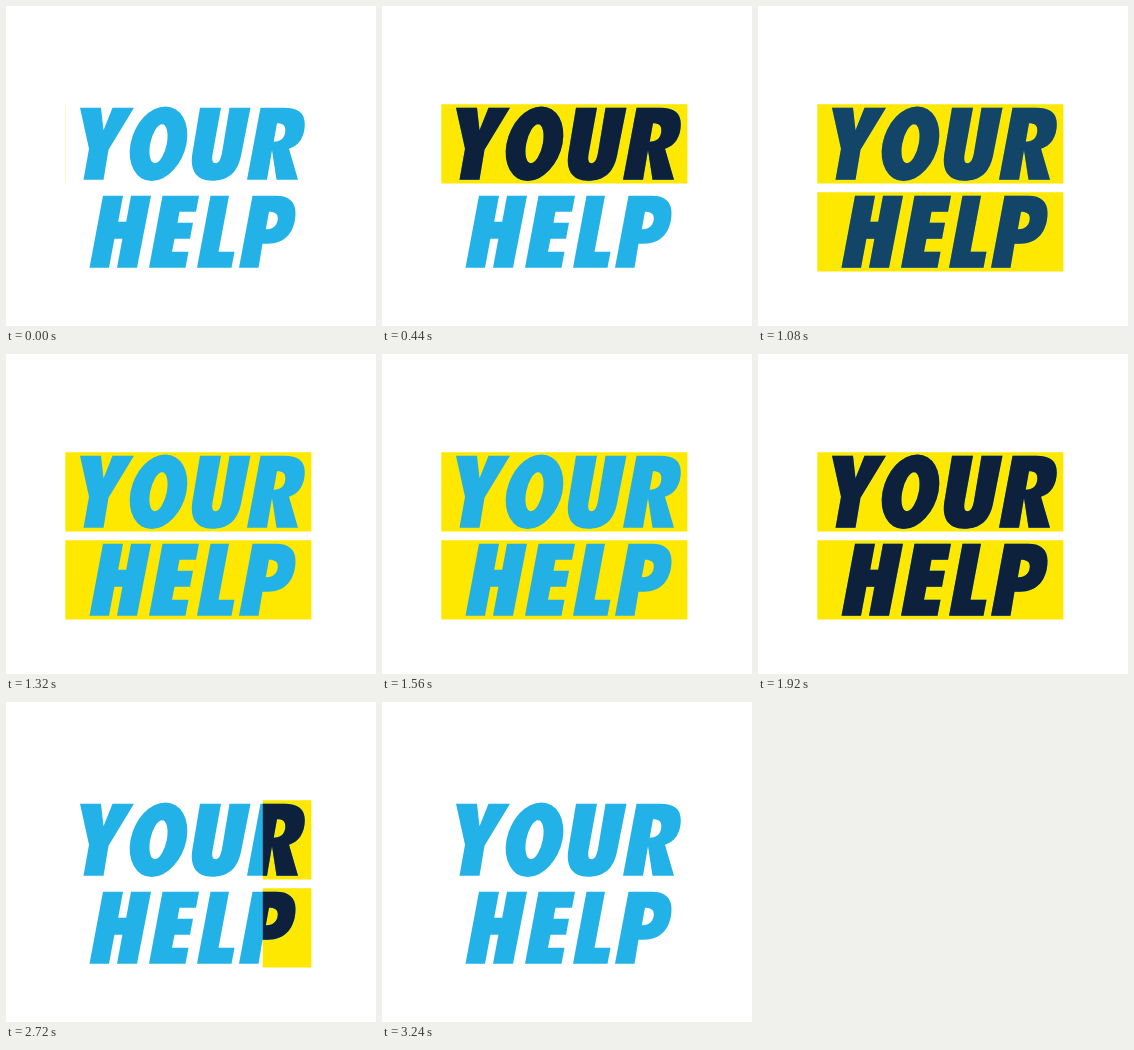
Write an HTML page that moves like this. It is 370 by 320 pixels and loops after 3360 ms.

```html
<!DOCTYPE html>
<html lang="en">
<head>
<meta charset="utf-8">
<title>Your help</title>
<style>
  html, body { margin: 0; width: 100%; height: 100%; overflow: hidden; background: #fff; }
  svg { display: block; width: 100%; height: 100%; }
</style>
</head>
<body>
<svg viewBox="0 0 370 320" role="img" aria-label="YOUR HELP">
  <defs>
    <g id="words" fill-rule="evenodd" transform="translate(0 -.3)">
      <!-- YOUR -->
      <path d="M74 102H95L97.5 124.5L106.5 102H128L102.5 144L97.5 174H77.5L83 143Z"/>
      <path transform="translate(152.5 138) skewX(-10.5)"
        d="M-28 0a28 37.3 0 1 0 56 0a28 37.3 0 1 0-56 0ZM-8.3 0a8.3 19.5 0 1 0 16.6 0a8.3 19.5 0 1 0-16.6 0Z"/>
      <path d="M194 102H215L207 146C205.5 153 206 157.5 209.5 157.5C213.5 157.5 215 152 216 147L223.5 102H244.5L235 150C231.5 167 222 175 206 175C190 175 183.5 164 186.5 147Z"/>
      <path d="M254.5 102H278C292 102 299 107 298.8 119C298.5 131 293 140 283 143L292 174H270.5L266 144.5L261 174H241ZM271 117.5L267.7 136C275 136 279 132 279.3 125C279.5 119.5 277 117.5 271 117.5Z"/>
      <!-- HELP -->
      <path d="M97 190H117L112.2 216H120.2L125 190H145L131 262H111L116.4 233H108.4L103 262H83.5Z"/>
      <path d="M156.5 190H193L190 206H173.5L171.5 217H187L184 233H168.5L166 246H182.5L179.5 262H143Z"/>
      <path d="M204.5 190H223L212.5 246H228.5L225.5 262H191Z"/>
      <path d="M246.5 190H270C283 190 289.5 196 289.5 207C289.5 226 279 238 262 238H256.5L252.5 262H233ZM263 206L259.8 223.5C267 224 271.5 219.5 271.8 213C272 208 269 206 263 206Z"/>
    </g>
    <clipPath id="covered"><path id="coveredArea"/></clipPath>
  </defs>
  <path id="bars" fill="#ffe800"/>
  <use href="#words" fill="#23b2e7"/>
  <g clip-path="url(#covered)">
    <use id="dark" href="#words" fill="#0d213d"/>
  </g>
</svg>
<script>
  const LOOP = 3360, LEFT = 59.3, RIGHT = 305.4, HEIGHT = 79.1, WIPE = 400;
  const rows = [{ y: 98.3, start: 0 }, { y: 186.3, start: 520 }];
  const leaveStart = 2400;
  const byId = id => document.getElementById(id);
  const progress = (t, start, length) => Math.min(1, Math.max(0, (t - start) / length));
  const mix = p => LEFT + (RIGHT - LEFT) * p;
  const box = (left, right, y) => right > left ? `M${left} ${y}H${right}v${HEIGHT}H${left}Z` : '';

  function draw(t) {
    const left = mix(progress(t, leaveStart, WIPE));
    const area = rows
      .map(({ y, start }) => box(left, mix(progress(t, start, WIPE) ** 1.15), y))
      .join('');
    byId('bars').setAttribute('d', area);
    byId('coveredArea').setAttribute('d', area);
    byId('dark').setAttribute('opacity', 1 - progress(t, 1040, 160) + progress(t, 1560, 160));
  }

  function tick() {
    draw(performance.now() % LOOP);
    requestAnimationFrame(tick);
  }
  tick();
</script>
</body>
</html>
```
